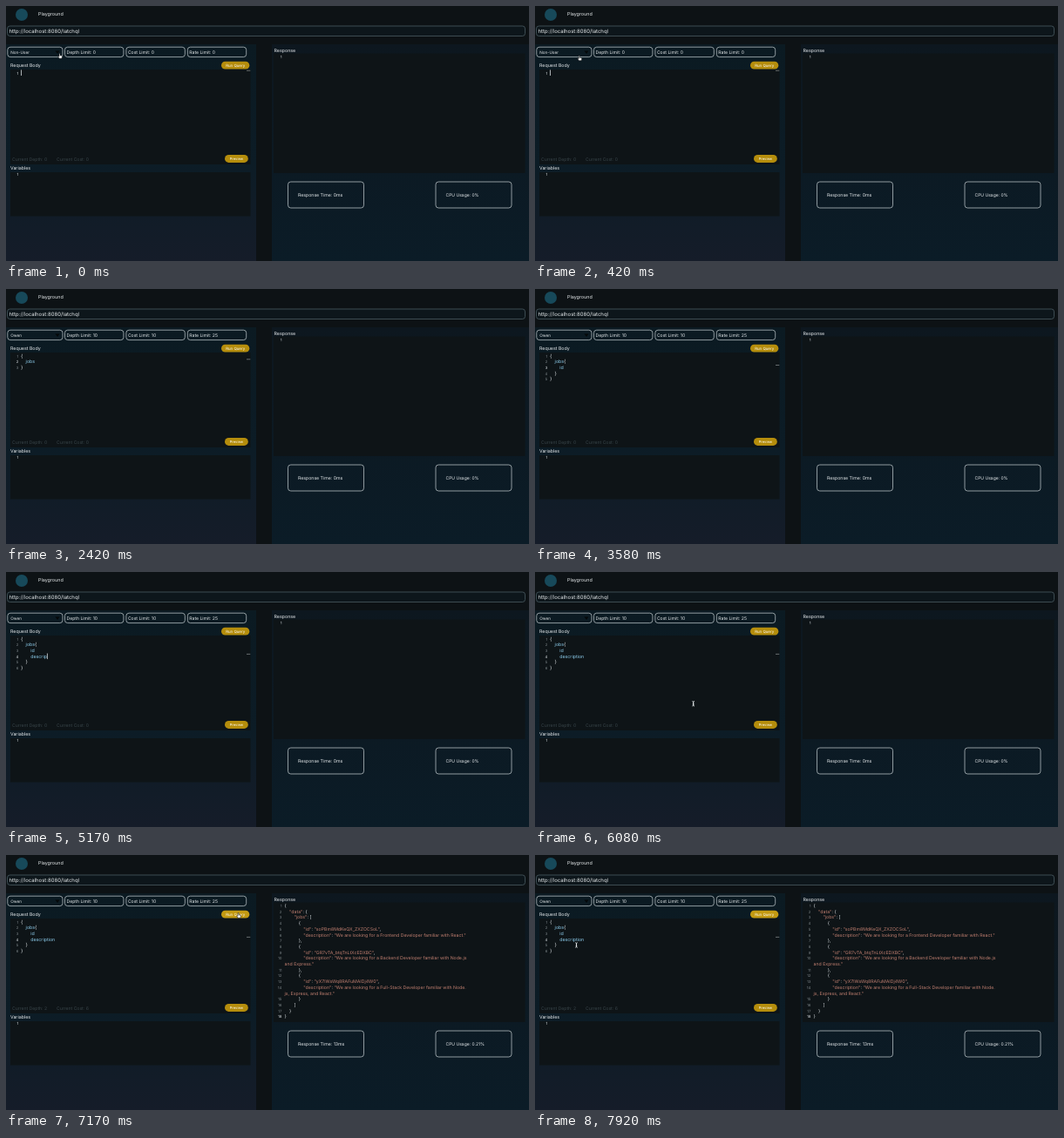
Recreate the animation shown at these times as an HTML page. Size 600 by 293 pixels, loop 8 s.

```html
<!DOCTYPE html>
<html lang="en">
<head>
<meta charset="utf-8">
<title>Playground</title>
<style>
  html, body { margin: 0; width: 100%; height: 100%; overflow: hidden; background: #0d1215; }
  svg { display: block; width: 100%; height: 100%; }
  text { font-family: Inter, "Open Sans", sans-serif; fill: #e8ecee; white-space: pre; text-rendering: geometricPrecision; }
  .box { fill: none; stroke: #c9d1d4; stroke-width: .7; }
  .editor { fill: #0e1417; }
</style>
</head>
<body>
<svg id="stage" viewBox="0 0 600 293">
  <defs>
    <linearGradient id="leftPane" x1="0" y1="0" x2="0" y2="1">
      <stop offset="0" stop-color="#0b1a22"/><stop offset=".55" stop-color="#0c1c26"/><stop offset="1" stop-color="#151c29"/>
    </linearGradient>
    <linearGradient id="rightPane" x1="0" y1="0" x2="0" y2="1">
      <stop offset="0" stop-color="#0d171f"/><stop offset="1" stop-color="#0b1c27"/>
    </linearGradient>
  </defs>
</svg>
<script>
const LOOP = 8000, STEP = 1000 / 12;
const LINE = 6.7;
const WHITE = '#dfe5e8', FIELD = '#8fd0f0', STRING = '#c07f70', DIM = '#39454a', NUMBER = '#7c8588';
const stage = document.getElementById('stage');

function add(name, attrs, parent = stage) {
  const node = document.createElementNS('http://www.w3.org/2000/svg', name);
  for (const key in attrs) node.setAttribute(key, attrs[key]);
  parent.append(node);
  return node;
}
function label(content, x, y, size, fill = '', parent = stage, anchor = 'start') {
  const node = add('text', { x, y, 'font-size': size, 'text-anchor': anchor }, parent);
  if (fill) node.style.fill = fill;
  node.textContent = content;
  return node;
}
const rect = (x, y, width, height, attrs) => add('rect', { x, y, width, height, ...attrs });
const box = (x, y, w, h) => rect(x, y, w, h, { class: 'box', rx: 3.2 });
const editor = (x, y, w, h) => rect(x, y, w, h, { class: 'editor' });
function button(content, x, y, w, h, size) {
  const pill = rect(x, y, w, h, { rx: h / 2, fill: '#b58d0c' });
  label(content, x + w / 2, y + h / 2 + size * .36, size, '#fff', stage, 'middle');
  return pill;
}
function setText(node, content) {
  if (node.textContent !== content) node.textContent = content;
}

// Page
add('circle', { cx: 18, cy: 10, r: 7, fill: '#17495a' });
label('Playground', 37, 11.1, 5.4);
rect(1.5, 23, 594, 11.5, { rx: 3, fill: '#0d161b', stroke: '#52656c', 'stroke-width': .7 });
label('http://localhost:8080/latchql', 3.5, 30.6, 6);
rect(0, 44, 287, 249, { fill: 'url(#leftPane)' });
rect(305, 44, 295, 249, { fill: 'url(#rightPane)' });

box(1.8, 47.2, 63.2, 11.4);
const userText = label('', 5.2, 54.6, 4.7);
add('path', { d: 'M56.5 51.5h5l-2.5 3.6z', fill: '#050809' });
const limits = ['Depth', 'Cost', 'Rate'].map((name, i) => {
  const x = 67.5 + i * 70.4;
  box(x, 47.2, 67.4, 11.4);
  return { name, node: label('', x + 2, 54.8, 5.1) };
});

label('Request Body', 5, 70.4, 5.3);
editor(5, 73, 275.5, 109);
const depthText = label('', 7, 177.8, 5.1, DIM);
const costText = label('', 58, 177.8, 5.1, DIM);
const runButton = button('Run Query', 247, 63.8, 32.3, 8.8, 4.4);
button('Preview', 251, 171, 26.8, 8.9, 4.1);
label('Variables', 5, 188.4, 5.3);
editor(5, 191, 275.5, 50.5);
label('1', 14.3, 195.2, 4.3, WHITE, stage, 'end');

label('Response', 307.5, 52.8, 5.3);
editor(307, 54.5, 288.5, 137.5);
box(323.5, 202, 87, 30);
box(493, 202, 87, 30);
const timeText = label('', 335, 218.8, 5.2);
const cpuText = label('', 504.5, 218.8, 5);

// Request typing: each key is applied to the text around the caret
const keys = [
  [1420, '{'], [1580, '\n'],
  [1660, 'j'], [1740, 'o'], [1790, 'b'], [1840, 's'],
  [2660, '{'], [2830, '\n'], [2910, 'i'], [3000, 'd'],
  [4080, '\n'],
  [4330, 'd'], [4410, 'e'], [4580, 's'], [4750, 'c'], [4830, 'r'], [4910, 'i'], [5080, 'p'],
  [5250, 't'], [5330, 'i'], [5410, 'o'], [5500, 'n']
];
function press([before, after], key) {
  if (key === '{') return [before + '{', '}' + after];
  if (key !== '\n') return [before + key, after];
  const depth = before.split('{').length - 1;
  const tail = after[0] === '}' && before.endsWith('{') ? '\n' + '  '.repeat(depth - 1) : '';
  return [before + '\n' + '  '.repeat(depth), tail + after];
}
const states = [{ at: 0, text: ['', ''] }];
for (const [at, key] of keys) states.push({ at, text: press(states.at(-1).text, key) });

const code = add('g', {});
const caret = add('rect', { width: .8, height: 6.6, fill: '#d5dadc' });
const mark = add('rect', { x: 276, width: 4.3, height: .7, fill: '#8c9294' });
let shown;
function drawRequest(state) {
  if (state === shown) return;
  shown = state;
  const [before, after] = state.text;
  const active = before.split('\n').length - 1;
  code.replaceChildren();
  let end = 17;
  (before + after).split('\n').forEach((line, i) => {
    const y = 78.5 + i * LINE;
    label(i + 1, 14.3, y, 4.3, i === active ? WHITE : NUMBER, code, 'end');
    const word = line.trim();
    const x = 17 + (line.length - line.trimStart().length) * 2.8;
    const node = label('', x, y, 5.3, FIELD, code);
    node.textContent = word.replace(/[{}]/g, '');
    const width = node.getComputedTextLength();
    const brace = word.match(/[{}]+/);
    if (brace) label(brace[0], x + width, y, 5.6, WHITE, code);
    if (i === active) end = x + width + (brace ? 2.2 : 0);
  });
  caret.setAttribute('x', Math.max(end, 16.8));
  caret.setAttribute('y', 73.4 + active * LINE);
  mark.setAttribute('y', 73.8 + active * LINE);
}

// Response
const idle = label('1', 316.4, 59.9, 4.3, WHITE, stage, 'end');
const result = add('g', {});
const jobs = [
  ['soPBm8MdKeQX_ZXZOCSoL', 'Frontend Developer familiar with React.'],
  ['GR7vTA_btqTnLtXcEDXBC', 'Backend Developer familiar with Node.js', 'and Express.'],
  ['yX7lWsWq8RAFuMAIDj4W0', 'Full-Stack Developer familiar with Node.', 'js, Express, and React.']
];
let row = 0, lineNo = 0;
function resultLine(indent, content, wrapped = false) {
  const y = 60 + row++ * LINE;
  if (!wrapped) {
    lineNo++;
    label(lineNo, 316.4, y, 4.3, lineNo === 18 ? WHITE : NUMBER, result, 'end');
  }
  const node = label('', 319.6 + indent * 5.4, y, 5.2, '', result);
  for (const part of wrapped ? [content] : content.split(/("[^"]*"?)/)) {
    const span = add('tspan', {}, node);
    span.style.fill = wrapped || part[0] === '"' ? STRING : WHITE;
    span.textContent = part;
  }
}
resultLine(0, '{');
resultLine(1, '"data": {');
resultLine(2, '"jobs": [');
jobs.forEach(([id, text, rest], i) => {
  resultLine(3, '{');
  resultLine(4, `"id": "${id}",`);
  resultLine(4, `"description": "We are looking for a ${text}${rest ? '' : '"'}`);
  if (rest) resultLine(0, rest + '"', true);
  resultLine(3, i < 2 ? '},' : '}');
});
resultLine(2, ']');
resultLine(1, '}');
resultLine(0, '}');

// Pointer
const outline = { stroke: '#e8ecee', 'stroke-width': .5, 'stroke-linejoin': 'round' };
const shapes = {
  hand: add('path', { ...outline, stroke: '#111', fill: '#f2f4f5', d: 'M0-2.4q.8-.5 1 .4v1.7l2 .5q.8.3.5 1.2l-.6 1.9h-2.7l-1.6-2.2q.2-.8 1.4 0z' }),
  arrow: add('path', { ...outline, fill: '#050505', d: 'M-1-2.6v5l1.2-1 .8 1.8.9-.4-.8-1.7h1.5z' }),
  beam: add('path', { ...outline, 'stroke-width': .8, fill: 'none', d: 'M-1.3-2.7q1.3 0 1.3.7v4q0 .7-1.3.7M1.3-2.7q-1.3 0-1.3.7v4q0 .7 1.3.7M-.8.7h1.6' })
};
const moves = [
  [0, 61, 57, 'hand'], [330, 58, 57, 'hand'], [580, 30, 66, 'arrow'], [830, 27, 70, 'arrow'],
  [1080, 34, 80, 'beam'], [1420, 34, 80, ''],
  [5920, 60, 112, 'beam'], [6200, 255, 175, 'hand'], [6330, 264, 177, 'hand'], [6500, 266, 175, 'hand'],
  [6740, 281, 104, 'arrow'], [6920, 268, 70, 'hand'], [7170, 266, 69, 'hand'],
  [7420, 210, 84, 'beam'], [7830, 47.5, 103.5, 'beam'], [LOOP, 47.5, 103.5, 'beam']
];
function drawPointer(t) {
  const i = moves.findLastIndex(move => move[0] <= t);
  const [t0, x0, y0, shape] = moves[i];
  const [t1, x1, y1] = moves[i + 1] || moves[i];
  const p = t1 > t0 ? (t - t0) / (t1 - t0) : 0;
  const eased = p * p * (3 - 2 * p);
  for (const name in shapes) {
    shapes[name].style.display = name === shape ? '' : 'none';
    shapes[name].setAttribute('transform', `translate(${x0 + (x1 - x0) * eased} ${y0 + (y1 - y0) * eased})`);
  }
}

function draw(time) {
  // The picture advances in twelve steps a second
  const t = Math.floor((time % LOOP + 3.5) / STEP) * STEP;
  const chosen = t >= 660, previewed = t >= 6410, answered = t >= 7160;

  setText(userText, chosen ? 'Owen' : 'Non-User');
  limits.forEach(({ name, node }, i) => setText(node, `${name} Limit: ${chosen ? [10, 10, 25][i] : 0}`));
  setText(depthText, `Current Depth: ${previewed ? 2 : 0}`);
  setText(costText, `Current Cost: ${previewed ? 6 : 0}`);
  setText(timeText, `Response Time: ${answered ? 13 : 0}ms`);
  setText(cpuText, `CPU Usage: ${answered ? '0.21' : 0}%`);
  runButton.setAttribute('fill', t >= 6660 ? '#c39a12' : '#b58d0c');
  idle.style.display = answered ? 'none' : '';
  result.style.display = answered ? '' : 'none';

  const state = states.findLast(s => s.at <= t);
  drawRequest(state);
  const since = t - (t >= 1080 && t < 1420 ? 1080 : state.at);
  caret.style.display = t < 6330 && since % 1000 < 500 ? '' : 'none';
  drawPointer(t);
}

const start = performance.now();
function tick() {
  draw(performance.now() - start);
  requestAnimationFrame(tick);
}
tick();
</script>
</body>
</html>
```
